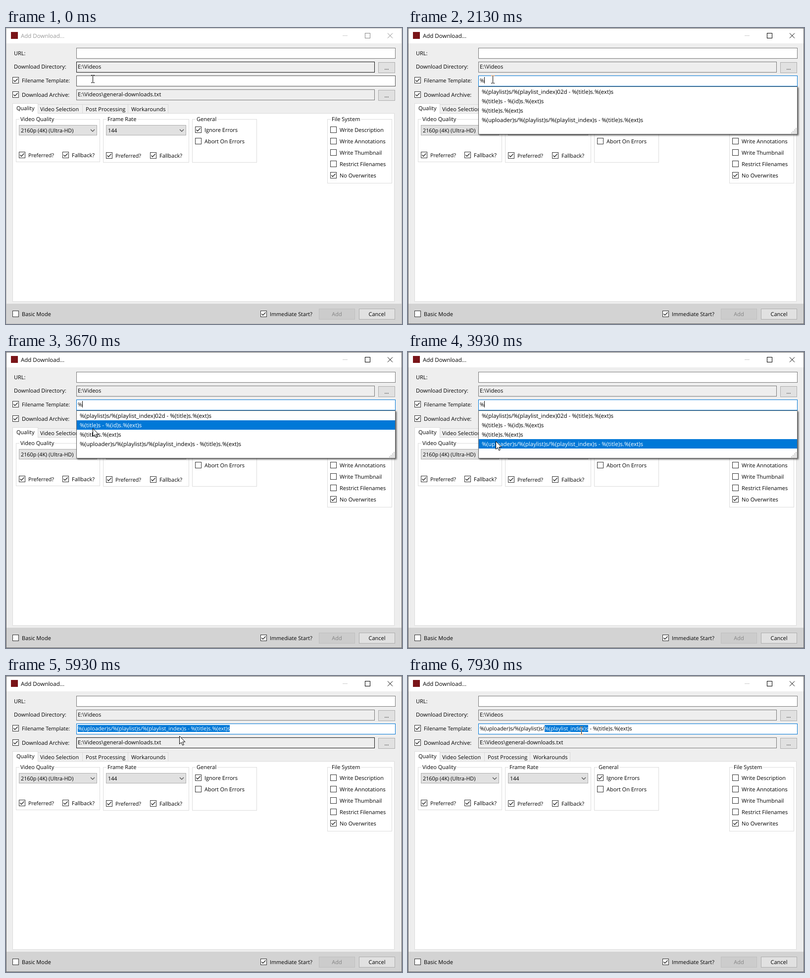
Animation, 800 px wide and 598 px high, one loop 8 s. Source, as an HTML page with a canvas:

```html
<!DOCTYPE html>
<html lang="en">
<head>
<meta charset="utf-8">
<title>Add Download</title>
<style>
html, body { margin: 0; width: 100%; height: 100%; overflow: hidden; background: #eee; }
canvas { display: block; }
</style>
</head>
<body>
<canvas id="stage" width="800" height="598"></canvas>
<script>
const ctx = document.getElementById('stage').getContext('2d');
const LOOP = 8000;
const BLUE = '#0078d7', GREY = '#7a7a7a', DARK = '#171717', EDGE = '#dcdcdc';
const TEMPLATE = '%(uploader)s/%(playlist)s/%(playlist_index)s - %(title)s.%(ext)s';
const WORD = '%(playlist_index)s';
const OPTIONS = [
  '%(playlist)s/%(playlist_index)02d - %(title)s.%(ext)s',
  '%(title)s - %(id)s.%(ext)s',
  '%(title)s.%(ext)s',
  TEMPLATE
];

// Pointer hotspot: [time, x, y]
const POINTER = [
  [0, 175, 103], [330, 175, 103], [400, 175, 104], [870, 175, 104], [1070, 173, 105],
  [1270, 171, 104], [3270, 171, 104], [3930, 177, 180], [4070, 177, 180],
  [4130, 175, 181], [5400, 175, 181], [5930, 350, 121], [6270, 395, 104],
  [6330, 390, 105], [7000, 390, 105], [7400, 350, 110], [LOOP, 350, 110]
];
// Spans in which the caret is lit
const CARET = [[1070, 1670], [2130, 2730], [3270, 4070], [4600, 5130],
  [6470, 7070], [7600, 7930]];

const within = (v, a, b) => v >= a && v < b;

function rect(x, y, w, h, fill) {
  ctx.fillStyle = fill;
  ctx.fillRect(x, y, w, h);
}

function box(x, y, w, h, fill, edge) {
  rect(x, y, w, h, edge);
  rect(x + 1, y + 1, w - 2, h - 2, fill);
}

function setFont(size) {
  ctx.font = `${size}px "Open Sans", "Noto Sans", sans-serif`;
}

function text(str, x, y, color = '#000', size = 11, align = 'left') {
  setFont(size);
  ctx.textAlign = align;
  ctx.fillStyle = color;
  ctx.fillText(str, x, y);
}

function line(points, color, width = 1) {
  ctx.beginPath();
  points.forEach(([x, y]) => ctx.lineTo(x, y));
  ctx.strokeStyle = color;
  ctx.lineWidth = width;
  ctx.stroke();
}

function check(x, y, label, on, size) {
  box(x, y, 13, 13, '#fff', '#333');
  if (on) line([[x + 2.5, y + 6.5], [x + 5, y + 9.3], [x + 10.5, y + 3.5]], '#222', 1.3);
  text(label, x + 19, y + 11, '#000', size);
}

function button(x, y, w, label, enabled = true) {
  box(x, y, w, 22, enabled ? '#e1e1e1' : '#ccc', enabled ? '#adadad' : '#bfbfbf');
  text(label, x + w / 2, y + 15, enabled ? '#000' : '#838383', 11, 'center');
}

function group(x, w, h, title) {
  box(x, 184, w, h, '#fff', EDGE);
  setFont(11);
  rect(x + 7, 184, ctx.measureText(title).width + 4, 1, '#fff');
  text(title, x + 9, 188);
}

function combo(x, w, value) {
  box(x, 196, w, 21, '#e1e1e1', '#adadad');
  text(value, x + 4, 211, '#000', 10.8);
  const c = x + w - 9;
  line([[c - 4, 205], [c, 209], [c + 4, 205]], '#444', 1.1);
}

function tab(x, w, label, pad) {
  box(x, 154, w, 19, '#f0f0f0', '#d9d9d9');
  text(label, x + pad, 168);
}

function titleBar(active) {
  rect(0, 0, 800, 31, '#fff');
  rect(10, 8, 14, 14, '#7a1418');
  text('Add Download...', 30, 20, active ? '#000' : '#999', 11.5);
  const ink = active ? '#000' : '#888';
  rect(680, 15, 10, 1, '#ccc');
  box(725, 10, 11, 11, '#fff', ink);
  line([[771, 10.5], [781, 20.5]], ink);
  line([[781, 10.5], [771, 20.5]], ink);
}

function form(t) {
  text('URL:', 16, 55);
  box(142, 40, 645, 22, '#fff', GREY);
  text('Download Directory:', 16, 82, '#000', 11.1);
  box(142, 68, 603, 22, '#eee', t < 400 ? DARK : GREY);
  text('E:\\Videos', 145, 82);
  button(752, 69, 34, '...');
  check(13, 99, 'Filename Template:', true, 10.7);
  box(142, 96, 645, 22, '#fff', t < 70 ? '#555' : t < 1000 ? DARK : BLUE);
  check(13, 128, 'Download Archive:', true, 11.1);
  box(142, 124, 603, 22, '#eee', within(t, 5730, 6470) ? DARK : GREY);
  text('E:\\Videos\\general-downloads.txt', 145, 138, '#000', 11.2);
  button(752, 125, 34, '...');
}

function tabPage() {
  box(13, 172, 772, 381, '#fff', EDGE);
  tab(63, 92, 'Video Selection', 6);
  tab(154, 93, 'Post Processing', 7);
  tab(246, 82, 'Workarounds', 7);
  box(13, 152, 52, 21, '#fff', EDGE);
  rect(14, 172, 50, 2, '#fff');
  text('Quality', 21, 166);

  group(20, 170, 87, 'Video Quality');
  combo(26, 158, '2160p (4K) (Ultra-HD)');
  check(26, 250, 'Preferred?', true, 10.7);
  check(114, 250, 'Fallback?', true);
  group(196, 174, 88, 'Frame Rate');
  combo(202, 162, '144');
  check(202, 251, 'Preferred?', true, 10.7);
  check(291, 251, 'Fallback?', true);
  group(376, 131, 88, 'General');
  check(382, 199, 'Ignore Errors', true);
  check(382, 222, 'Abort On Errors', false);
  group(649, 131, 130, 'File System');
  ['Write Description', 'Write Annotations', 'Write Thumbnail', 'Restrict Filenames', 'No Overwrites']
    .forEach((label, i) => check(655, 199 + 23 * i, label, i === 4));
}

function footer() {
  rect(0, 557, 800, 41, '#d3d3d3');
  check(13, 571, 'Basic Mode', false);
  check(514, 571, 'Immediate Start?', true, 10.8);
  button(632, 567, 73, 'Add', false);
  button(713, 567, 73, 'Cancel');
}

function filename(t) {
  const size = 10.9;
  const value = t < 2130 ? '' : t < 5130 ? '%' : TEMPLATE;
  const xAt = n => 145 + ctx.measureText(value.slice(0, n)).width;
  text(value, 145, 110, '#000', size);

  const start = t >= 7930 ? value.indexOf(WORD) : 0;
  const end = t >= 7930 ? start + WORD.length : within(t, 5130, 6470) ? value.length : 0;
  if (end) {
    const x = Math.round(xAt(start));
    rect(x, 99, Math.round(xAt(end)) - x, 14, BLUE);
    text(value.slice(start, end), xAt(start), 110, '#fff', size);
  }
  if (CARET.some(([a, b]) => within(t, a, b))) {
    const n = t < 5130 ? value.length
      : t < 7870 ? value.indexOf('%(ext)') : value.indexOf('dex)s');
    rect(Math.round(xAt(n)), 99, 1, 13, '#000');
  }
}

function popup(mouseY) {
  ctx.save();
  ctx.shadowColor = 'rgba(0,0,0,.6)';
  ctx.shadowBlur = 3;
  ctx.shadowOffsetX = ctx.shadowOffsetY = 2;
  rect(142, 118, 645, 97, '#646464');
  ctx.restore();
  rect(143, 119, 643, 95, '#fff');
  const hot = Math.floor((mouseY - 119) / 19);
  OPTIONS.forEach((option, i) => {
    if (i === hot) rect(143, 119 + 19 * i, 643, 19, BLUE);
    text(option, 149, 133 + 19 * i, i === hot ? '#fff' : '#000', 11.55);
  });
  for (let row = 0; row < 4; row++)
    for (let col = 0; col <= row; col++)
      rect(783 - 3 * col, 202 + 3 * row, 2, 2, '#bfbfbf');
}

function pointerAt(t) {
  const i = POINTER.findIndex(p => p[0] > t);
  const [t0, x0, y0] = POINTER[i - 1], [t1, x1, y1] = POINTER[i];
  const k = (t - t0) / (t1 - t0), e = k * k * (3 - 2 * k);
  return [Math.round(x0 + (x1 - x0) * e), Math.round(y0 + (y1 - y0) * e)];
}

function beam(x, y) {
  ctx.save();
  ctx.globalCompositeOperation = 'difference';
  for (const dy of [-8, 7]) {
    rect(x - 3, y + dy, 3, 1, '#fff');
    rect(x + 1, y + dy, 3, 1, '#fff');
  }
  rect(x, y - 7, 1, 14, '#fff');
  ctx.restore();
}

function arrow(x, y) {
  ctx.beginPath();
  [[0, 0], [0, 16], [3.7, 12.6], [6.3, 18.4], [8.8, 17.3], [6.3, 11.6], [11.4, 11.6]]
    .forEach(([dx, dy]) => ctx.lineTo(x + 0.5 + dx, y + 0.5 + dy));
  ctx.closePath();
  ctx.fillStyle = '#fff';
  ctx.fill();
  ctx.strokeStyle = '#000';
  ctx.lineWidth = 1;
  ctx.stroke();
}

function draw(t) {
  const active = t >= 930, open = within(t, 2130, 5130);
  const [x, y] = pointerAt(t);
  rect(0, 0, 800, 598, '#eee');
  titleBar(active);
  form(t);
  tabPage();
  footer();
  ctx.strokeStyle = active ? '#6b6b6b' : '#bbb';
  ctx.lineWidth = 1;
  ctx.strokeRect(0.5, 0.5, 799, 597);
  filename(t);
  if (open) popup(y);
  const overField = within(y, 96, 118) || (!open && within(y, 124, 146));
  (overField ? beam : arrow)(x, y);
}

let begin;
function tick(now) {
  begin ??= now;
  const step = Math.floor(((now - begin) % LOOP + 5) * 15 / 1000) % 120;
  draw(Math.round(step * 20 / 3) * 10);
  requestAnimationFrame(tick);
}

ctx.textRendering = 'geometricPrecision';
requestAnimationFrame(tick);
</script>
</body>
</html>
```
